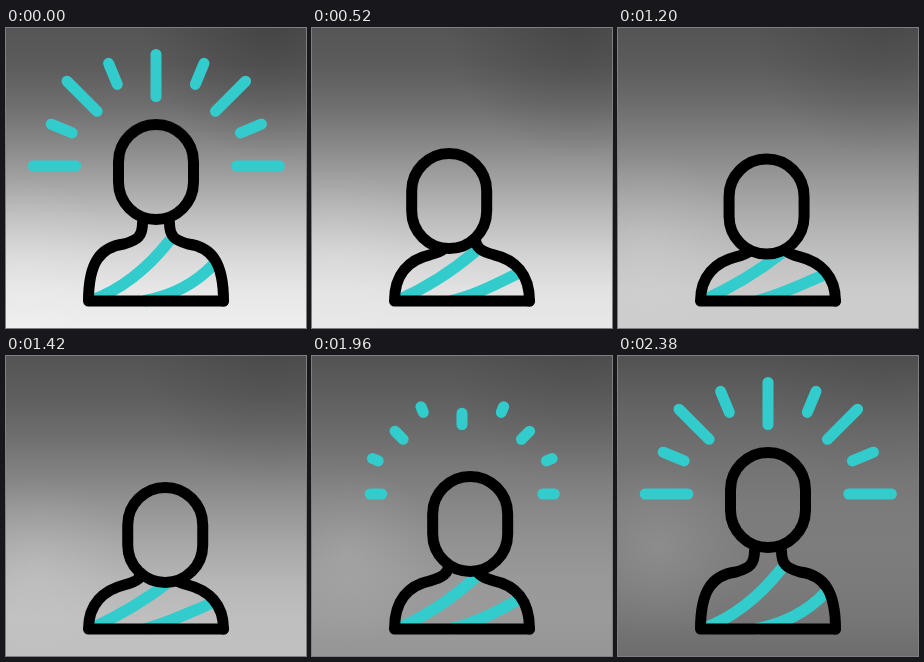
An HTML page with a canvas for the animation above (2400 ms loop, 300 by 300 pixels).

```html
<!DOCTYPE html>
<html>
<head>
<meta charset="utf-8">
<style>
html, body { margin: 0; height: 100%; overflow: hidden; }
canvas { display: block; width: 100vw; height: 100vh; }
</style>
</head>
<body>
<canvas id="stage" width="300" height="300"></canvas>
<script>
const ctx = document.getElementById('stage').getContext('2d');
const LOOP = 2400, TEAL = '#33cccc', LINE = 11;
const mix = (a, b, k) => a + (b - a) * k;
const span = (t, from, to) => Math.min(1, Math.max(0, (t - from) / (to - from)));
const ease = (p, n = 3) => p < .5 ? (2 * p) ** n / 2 : 1 - (2 - 2 * p) ** n / 2;

function stroke(path, color, width = LINE) {
  ctx.strokeStyle = color;
  ctx.lineWidth = width;
  ctx.stroke(new Path2D(path));
}

function glow(x, y, r, rgb, alpha) {
  const g = ctx.createRadialGradient(x, y, 0, x, y, r);
  g.addColorStop(0, `rgba(${rgb},${alpha})`);
  g.addColorStop(1, `rgba(${rgb},0)`);
  ctx.fillStyle = g;
  ctx.fillRect(0, 0, 300, 300);
}

// A bright misty slope that dims into flat grey cloud
function background(p) {
  const g = ctx.createLinearGradient(0, 0, 0, 300);
  for (let y = 0; y <= 1; y += .125) {
    const mist = mix(85, 238, y * y * (3 - 2 * y));
    const cloud = 82 + 42 * Math.sin(Math.PI * y * .8);
    const v = mix(mist, cloud, p * p);
    g.addColorStop(y, `rgb(${v},${v},${v})`);
  }
  ctx.fillStyle = g;
  ctx.fillRect(0, 0, 300, 300);
  glow(265, 0, 130, '30,30,30', mix(.3, .1, p));
  glow(mix(20, 40, p), mix(240, 190, p), 90, '255,255,255', .12);
}

// Draws the part of a ray between from and to, 0 being its outer end
function ray(x, y, angle, half, from, to) {
  const point = k => {
    const r = half * (1 - 2 * k);
    return `${x + r * Math.cos(angle)} ${y - r * Math.sin(angle)}`;
  };
  stroke(`M${point(from)}L${point(to)}`, TEAL);
}

function rays(t) {
  const shrink = ease(span(t, 60, 520)), grow = ease(span(t, 1728, 2300));
  const from = t < 1000 ? 0 : 1 - grow, to = t < 1000 ? 1 - shrink : 1;
  if (from === to) return;
  for (let i = 0; i < 4; i++) {
    const place = i * .377, tilt = i * Math.PI / 8, half = i % 2 ? 11.4 : 21.3;
    const dx = 101.8 * Math.cos(place), y = 138 - 101.8 * Math.sin(place);
    ray(150.3 + dx, y, tilt, half, from, to);
    ray(150.3 - dx, y, Math.PI - tilt, half, from, to);
  }
  ray(150, 47.5, Math.PI / 2, 21, from, to);
}

function headOffset(t) {
  const left = ease(span(t, 20, 770));
  const right = ease(span(t, 770, 1630), 2.2);
  const back = 1 - ease(span(t, 1630, 2400));
  return [(-15 * left + 27 * right) * back, (34 * left + right) * back];
}

// low: 0 with the neck stretched, 1 with the head sunk
function body(low) {
  const m = (a, b) => mix(a, b, low);
  const shoulder = x => `M${x(136.5)} ${m(195, 215)}
    C${x(136.5)} ${m(208, 222)} ${x(m(132, 130))} ${m(212, 226)} ${x(118)} ${m(216, 229)}
    C${x(m(94, 98))} ${m(219, 234)} ${x(82.5)} ${m(235, 248)} ${x(82.5)} 273`;
  ctx.lineCap = 'butt';
  stroke(`M84 273C${m(115, 106)} ${m(262, 263)} ${m(142, 136)} ${m(240, 247)} 164 ${m(212, 225)}`, TEAL, 11.5);
  stroke(`M138 273C${m(170, 160)} ${m(267, 268)} ${m(192, 182)} ${m(253, 257)} ${m(208, 206)} ${m(236, 247)}`, TEAL, 11.5);
  ctx.lineCap = 'round';
  stroke(shoulder(x => x) + 'H217.5', '#000');
  stroke(shoulder(x => 300 - x), '#000');
}

function draw(t) {
  const [dx, dy] = headOffset(t);
  ctx.lineCap = ctx.lineJoin = 'round';
  background(t / LOOP);
  rays(t);

  const head = new Path2D(), outside = new Path2D();
  head.roundRect(112.5 + dx, 96.5 + dy, 75, 95, 37.5);
  outside.rect(0, 0, 300, 300);
  outside.addPath(head);
  ctx.save();
  ctx.clip(outside, 'evenodd');
  body(dy / 35);
  ctx.restore();
  stroke(head, '#000');
}

const start = performance.now();
function frame() {
  draw((performance.now() - start) % LOOP);
  requestAnimationFrame(frame);
}
frame();
</script>
</body>
</html>
```
